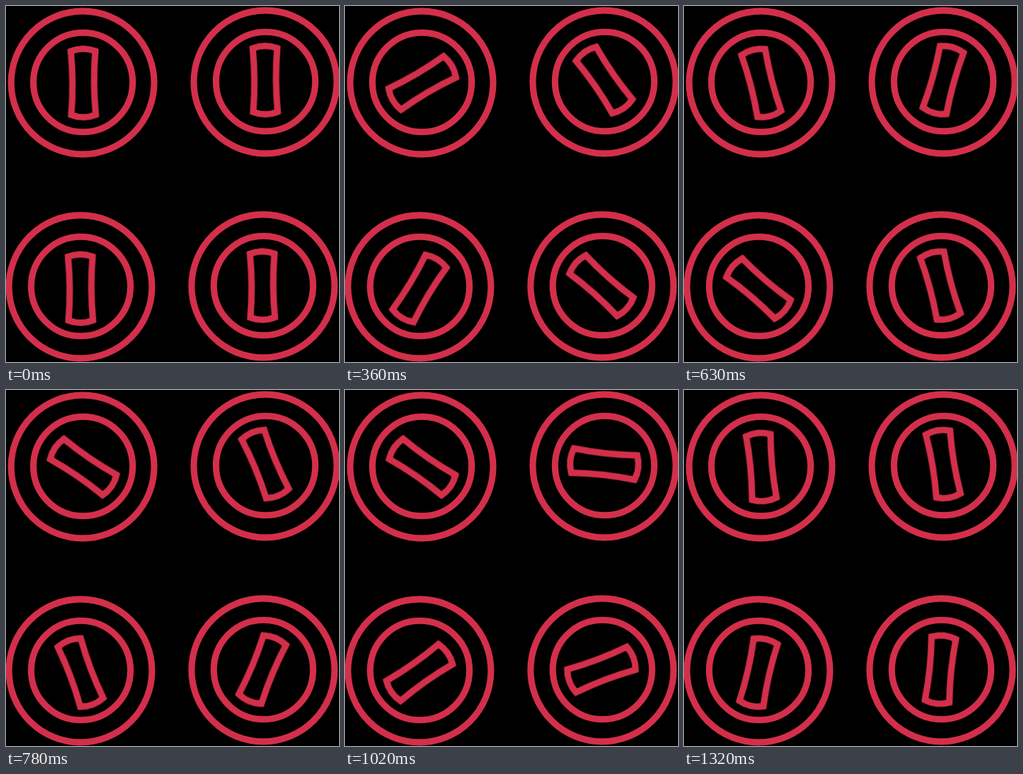
Recreate the animation shown at these times as an HTML page. Size 454 by 485 pixels, loop 1.35 s.

```html
<!DOCTYPE html>
<html lang="en">
<head>
<meta charset="utf-8">
<title>Dials</title>
<style>
  html, body { margin: 0; width: 100%; height: 100%; overflow: hidden; background: #000; }
  svg { display: block; width: 454px; height: 485px; }
  circle, path { fill: none; stroke: #d32f4b; stroke-width: 8.8; stroke-miterlimit: 8; }
</style>
</head>
<body>
<svg viewBox="0 0 454 485"></svg>
<script>
const STEPS = 45, LOOP = 1350, TILT = -0.4;
const BAR = 'M-16.7-43.3Q0-50 16.7-43.3Q12.8 0 16.7 43.3Q0 50-16.7 43.3Q-12.8 0-16.7-43.3Z';

// Turning points of each dial as [step, degrees]; every dial starts and ends upright.
const swings = [
  [[12, 60], [29, -80]],
  [[14, -40], [21, 16], [35, -91]],
  [[11.5, 36], [22, -58], [38, 93]],
  [[15, -60], [33, 76]]
];

const svg = document.querySelector('svg');

function add(parent, tag, attrs) {
  const el = document.createElementNS('http://www.w3.org/2000/svg', tag);
  for (const key in attrs) el.setAttribute(key, attrs[key]);
  return parent.appendChild(el);
}

function angleAt(swing, step) {
  const turns = [[0, 0], ...swing, [STEPS, 0]];
  const i = Math.max(1, turns.findIndex(([s]) => s >= step));
  const [s0, a0] = turns[i - 1], [s1, a1] = turns[i];
  return a0 + (a1 - a0) * (step - s0) / (s1 - s0);
}

swings.forEach((swing, i) => {
  const col = i % 2, row = i >> 1;

  // the grid is slightly skewed, and the bars sit a little off the ring centres
  const cx = 104.5 + 249 * col - 3 * row, cy = 104.5 - col + 278 * row;
  const hubX = 105.4 + 248 * col - 3.8 * row, hubY = 104.9 - 4 * col + 280 * row;

  add(svg, 'circle', { cx, cy, r: 97.5 });
  add(svg, 'circle', { cx: cx + 0.5, cy: cy - 0.5, r: 67.7 });
  const hub = add(svg, 'g', { transform: `translate(${hubX} ${hubY})` });
  const bar = add(hub, 'path', { d: BAR });

  const frames = Array.from({ length: STEPS + 1 }, (_, step) => ({
    offset: step / STEPS,
    transform: `rotate(${angleAt(swing, step) + TILT}deg)`,
    easing: 'steps(1, end)'
  }));
  // the tiny head start keeps step edges clear of rounding
  bar.animate(frames, { duration: LOOP, iterations: Infinity, delay: -0.5 });
});
</script>
</body>
</html>
```
